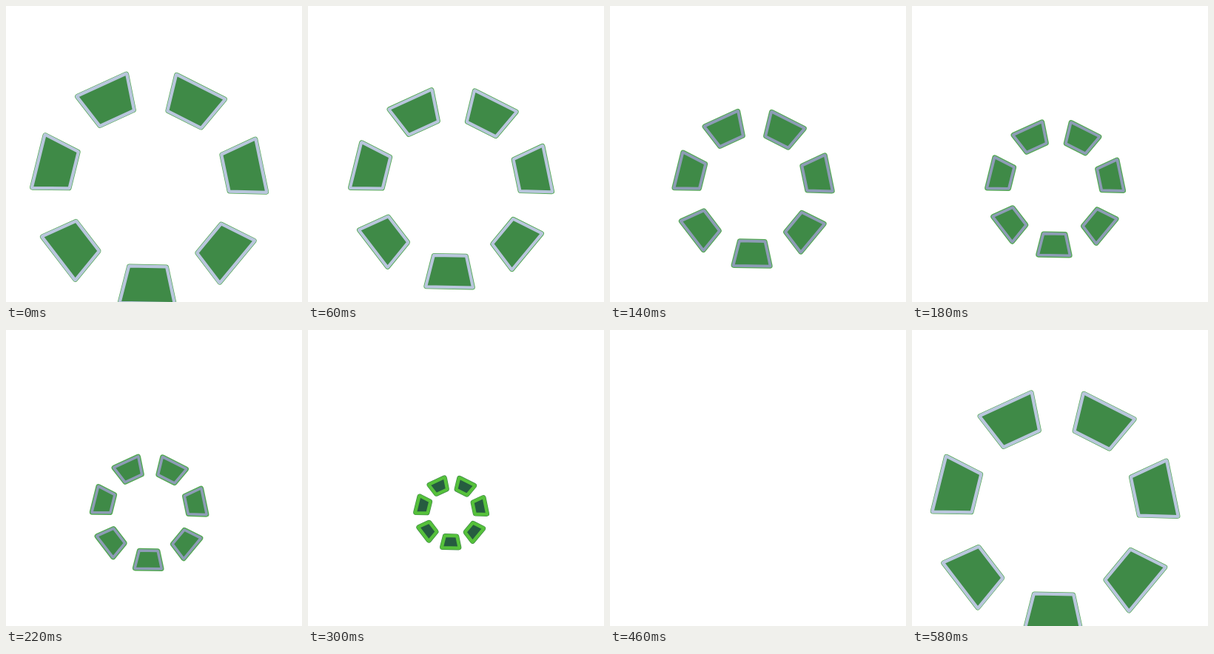
An HTML page with a canvas for the animation above (0.6 s loop, 400 px wide and 400 px high).

```html
<!DOCTYPE html>
<html lang="en">
<head>
<meta charset="utf-8">
<title>Shrinking ring</title>
<style>
  html, body { margin: 0; width: 100%; height: 100%; overflow: hidden; background: #fff; }
  canvas { display: block; }
</style>
</head>
<body>
<canvas width="400" height="400"></canvas>
<script>
const ctx = document.querySelector('canvas').getContext('2d');
const LOOP = 600, STEP = 20, GONE = 460, RESTART = 580, VANISH = 430;
const COUNT = 7, CX = 193.6, CY = 247, INNER = 108.7, OUTER = 157.8;
const RAD = Math.PI / 180, START = 91.1 * RAD, HALF = 13.2 * RAD;
const EDGE = 7.5, LIP = 2.5;

function tile(angle, scale) {
  const corners = [[INNER, -HALF], [OUTER, -HALF], [OUTER, HALF], [INNER, HALF]];
  ctx.beginPath();
  for (const [r, a] of corners) {
    ctx.lineTo(CX + r * scale * Math.cos(angle + a), CY + r * scale * Math.sin(angle + a));
  }
  ctx.closePath();
}

function stroke(color, width) {
  ctx.strokeStyle = color;
  ctx.lineWidth = width;
  ctx.stroke();
}

function draw(t) {
  ctx.clearRect(0, 0, 400, 400);
  if (t >= GONE && t < RESTART) return;
  const time = t >= RESTART ? t - LOOP : t;
  const scale = Math.max(0.001, 1 - time / VANISH);
  const late = time >= 260;
  const rim = late ? '#56c13b' : time < 100 ? '#b9c6dd' : '#8d9cb6';
  // the halo shows more as the ring shrinks, until the rim turns green
  const rimWidth = EDGE - 1.4 - (late ? 0 : Math.max(0, time) / 140);
  ctx.lineJoin = 'round';
  for (let i = 0; i < COUNT; i++) {
    tile(START + i * 2 * Math.PI / COUNT, scale);
    stroke(late ? '#3f8a47' : '#55a955', EDGE);
    stroke(rim, rimWidth);
    ctx.fillStyle = late ? '#265c40' : '#3f8a47';
    ctx.fill();
    // the rim reaches less far inwards than outwards
    stroke(rim, LIP);
  }
}

function frame(now) {
  draw(Math.floor(now % LOOP / STEP) * STEP);
  requestAnimationFrame(frame);
}
draw(0);
requestAnimationFrame(frame);
</script>
</body>
</html>
```
